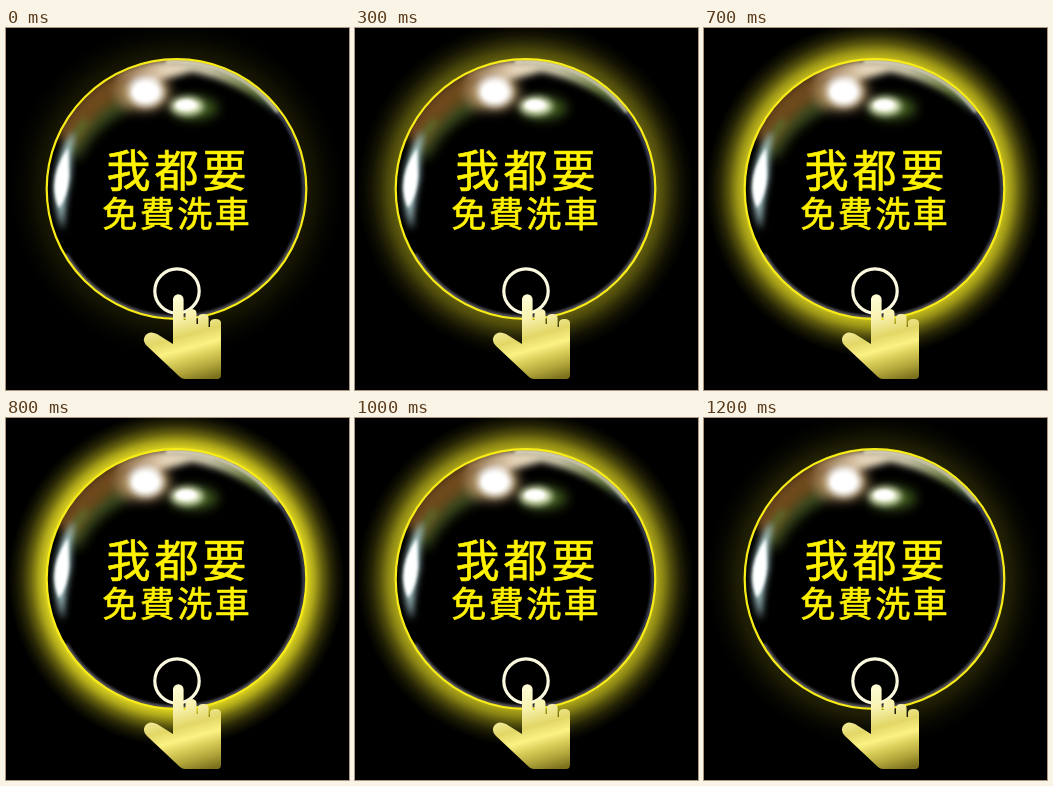
An HTML page for the animation above (1400 ms loop, 343 px wide and 362 px high).

```html
<!DOCTYPE html>
<html lang="zh-Hant">
<head>
<meta charset="utf-8">
<style>
html, body { margin: 0; width: 100%; height: 100%; overflow: hidden; background: #000; }
svg { display: block; width: 343px; height: 362px; }
text {
  font-family: "Noto Sans CJK TC", "Noto Sans CJK", sans-serif; font-weight: 500;
  fill: #fff200; stroke: #fff200; stroke-width: .7px; text-anchor: middle;
}
</style>
</head>
<body>
<svg viewBox="0 0 343 362">
  <defs>
    <radialGradient id="halo" gradientUnits="userSpaceOnUse" cx="170.5" cy="161" r="168">
      <stop offset=".774" stop-color="#f6ec24"/>
      <stop offset=".82" stop-color="#f6ec24" stop-opacity=".78"/>
      <stop offset=".87" stop-color="#f6ec24" stop-opacity=".45"/>
      <stop offset=".92" stop-color="#f6ec24" stop-opacity=".2"/>
      <stop offset=".96" stop-color="#f6ec24" stop-opacity=".08"/>
      <stop offset="1" stop-color="#f6ec24" stop-opacity="0"/>
    </radialGradient>
    <linearGradient id="gold" gradientUnits="userSpaceOnUse" x1="166" y1="266" x2="190" y2="354">
      <stop offset="0" stop-color="#ffffdc"/>
      <stop offset=".28" stop-color="#f8f1ae"/>
      <stop offset=".48" stop-color="#e2d766"/>
      <stop offset=".62" stop-color="#fbf284"/>
      <stop offset=".74" stop-color="#d8cc58"/>
      <stop offset=".87" stop-color="#b0a43a"/>
      <stop offset="1" stop-color="#7c721e"/>
    </linearGradient>
    <linearGradient id="sheen" gradientUnits="userSpaceOnUse" x1="105" y1="0" x2="285" y2="0">
      <stop offset="0" stop-color="#7a5428"/>
      <stop offset=".3" stop-color="#e6d4b8"/>
      <stop offset=".55" stop-color="#d8d4b4"/>
      <stop offset=".8" stop-color="#70883e"/>
      <stop offset="1" stop-color="#3a5c98"/>
    </linearGradient>
    <filter id="soft" x="-100%" y="-100%" width="300%" height="300%"><feGaussianBlur stdDeviation="6"/></filter>
    <filter id="mid" x="-100%" y="-100%" width="300%" height="300%"><feGaussianBlur stdDeviation="3.5"/></filter>
    <filter id="fine" x="-50%" y="-50%" width="200%" height="200%"><feGaussianBlur stdDeviation="1.5"/></filter>
    <clipPath id="ball"><circle cx="170.5" cy="161" r="130"/></clipPath>
  </defs>

  <circle id="glow" cx="170.5" cy="161" r="168" fill="url(#halo)"/>
  <circle cx="170.5" cy="161" r="130"/>

  <!-- reflections -->
  <g clip-path="url(#ball)" fill="none">
    <g filter="url(#soft)">
      <path d="M66 128Q84 88 128 72" stroke="#38481a" stroke-width="16"/>
      <path d="M58 112A118 118 0 0 1 158 44" stroke="#70491a" stroke-width="24"/>
      <ellipse cx="138" cy="64" rx="26" ry="18" fill="#a88a5c"/>
      <ellipse cx="188" cy="80" rx="24" ry="11" fill="#405c1e"/>
    </g>
    <g filter="url(#mid)">
      <path d="M112 46A129 129 0 0 1 277 90Q232 52 186 44Q148 56 112 56Z" fill="url(#sheen)"/>
      <path d="M60 134Q64 110 80 92" stroke="#56702c" stroke-width="6"/>
      <ellipse cx="140" cy="64" rx="17" ry="14" fill="#fff"/>
      <ellipse cx="181" cy="78" rx="16" ry="9" fill="#eef4d4"/>
      <path d="M66 104Q38 150 57 202Q58 176 64 150Z" fill="#b4d8dc"/>
    </g>
    <g filter="url(#fine)">
      <path d="M62 120Q40 152 53 180Q62 168 63 148Z" fill="#fff"/>
      <ellipse cx="139" cy="64" rx="12" ry="9" fill="#fff"/>
      <ellipse cx="180" cy="77" rx="10" ry="5" fill="#fff"/>
      <path d="M160 34A127 127 0 0 1 272 84" stroke="#f2ead0" stroke-opacity=".8" stroke-width="4"/>
      <path d="M272 84A128 128 0 0 1 286 216" stroke="#8088b8" stroke-opacity=".7" stroke-width="2.5"/>
      <path d="M286 216A128 128 0 0 1 60 226" stroke="#b8b4c4" stroke-opacity=".7" stroke-width="2.5"/>
    </g>
  </g>
  <circle cx="170.5" cy="161" r="129.8" fill="none" stroke="#f8ec18" stroke-width="2.2"/>

  <text x="172.5" y="158.5" font-size="44" letter-spacing="4">我都要</text>
  <text x="171.2" y="198.6" font-size="35" letter-spacing="2.5">免費洗車</text>

  <!-- pointing hand -->
  <circle cx="171" cy="263" r="22.2" fill="none" stroke="#fbf9df" stroke-width="3.2"/>
  <path fill="url(#gold)" d="M167 271.5a5.2 5.2 0 0 1 10.6 0V292H179.5V285q0-4 5.5-4t5.5 4V296H192V290q0-4 5.3-4t5.3 4V299H204V295q0-4 5.5-4t5.5 4V347q0 4-4 4H179q-3 0-5-2L141 318q-5-5-2-10 4-6 12-2L167 316Z"/>
</svg>
<script>
const glow = document.getElementById("glow");
const PEAK = 9, LAST = 12;

// The glow climbs in even steps to its peak, falls faster, then rests.
function level(step) {
  return step <= PEAK ? 0.1 + 0.1 * step : 1 - 0.285 * (Math.min(step, LAST) - PEAK);
}

const start = performance.now();
function draw() {
  const time = (performance.now() - start) % 1400;
  glow.setAttribute("opacity", level(Math.floor(time / 100)));
  requestAnimationFrame(draw);
}
draw();
</script>
</body>
</html>
```
